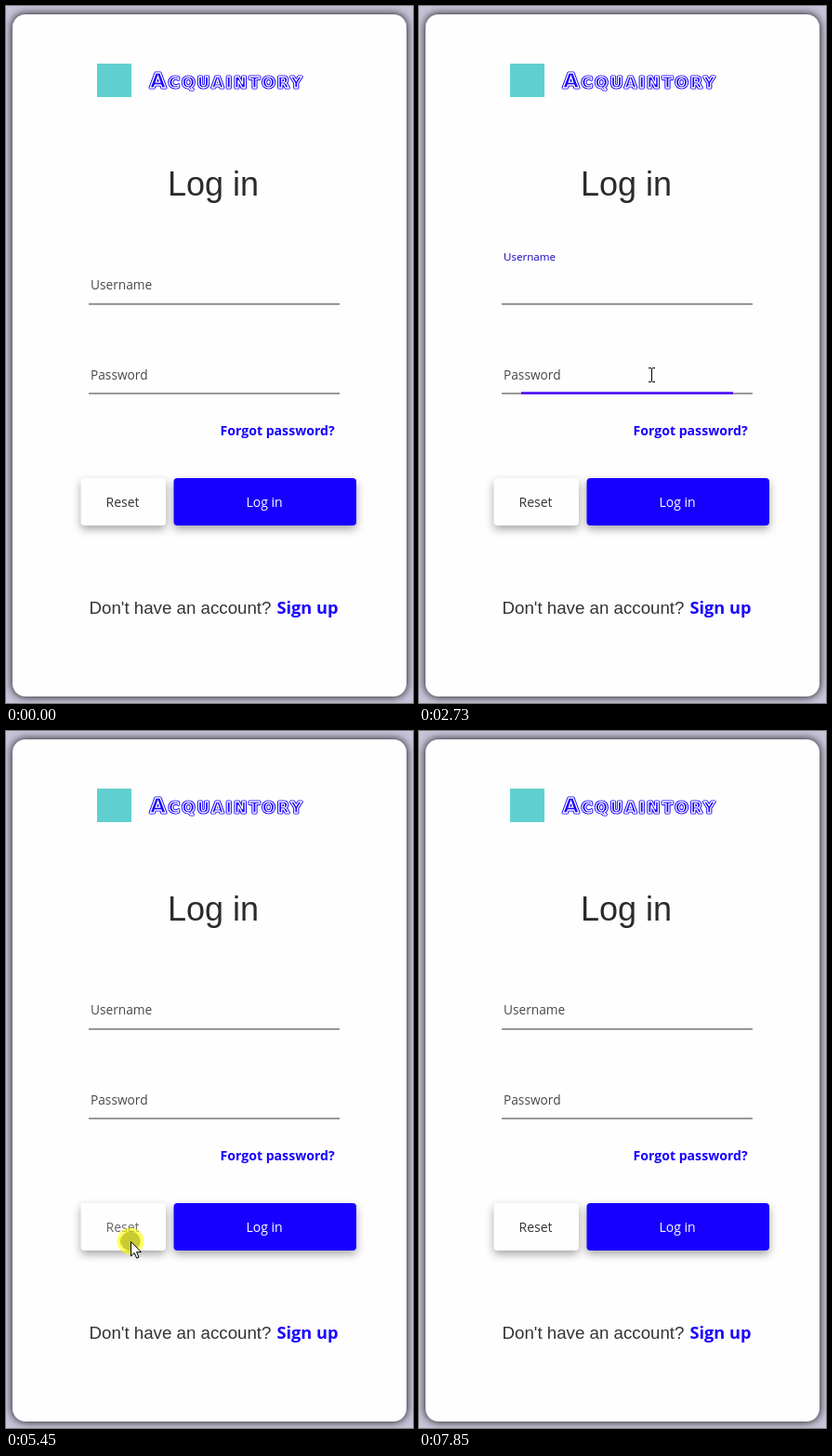
Recreate the animation shown at these times as an HTML page. Size 438 px wide and 750 px high, loop 8780 ms.

```html
<!DOCTYPE html>
<html lang="en">
<head>
<meta charset="utf-8">
<title>Log in</title>
<style>
html, body { margin: 0; width: 100%; height: 100%; overflow: hidden; background: #c6c4d8; }
.card {
  position: absolute; left: 7px; top: 9px; width: 424px; height: 734px;
  border-radius: 14px; background: #fefefe; box-shadow: 0 0 9px 1px rgba(0, 0, 0, .8);
}
svg { position: absolute; left: 0; top: 0; }
text { font: 14px "Open Sans", "Noto Sans", sans-serif; fill: #333; }
.title { font: 36px "Liberation Sans", sans-serif; fill: #2b2b2b; }
.ask { font: 18.72px "Liberation Sans", sans-serif; }
.link { font-weight: 700; font-size: 14.1px; fill: #1800ff; }
.big { font-size: 18.2px; }
.brand text { font: 700 16px "DejaVu Sans", sans-serif; letter-spacing: 2.9px; fill: #1800ff; }
.brand tspan { font-size: 22px; }
.edge { stroke: #1800ff; stroke-width: 3.2; stroke-linejoin: round; }
.inline { stroke: #fefefe; stroke-width: 1.3; }
.btn { filter: drop-shadow(0 4px 5px rgba(0, 0, 0, .35)); }
.line { fill: #777; }
.label { font-size: 13.7px; fill: #484848; }

/* 8.78 s loop; 1% is 87.8 ms */
.a { animation: 8.78s step-end infinite; }
.focus, .ripple { transform-box: fill-box; transform-origin: center; }
#userLabel { animation-name: userLabel; }
#passLabel { animation-name: passLabel; }
#userLine { animation-name: userLine; fill: #1400c8; }
#passLine { animation-name: passLine; fill: #5010ff; }
#userCaret { animation-name: userCaret; }
#passCaret { animation-name: passCaret; }
#logBtn { animation-name: logBtn; fill: #1800ff; }
#logWave { animation-name: logWave; fill: #9488ff; }
#resetText { animation-name: resetText; }
#resetWave { animation-name: resetWave; fill: #222; }
#pointer { animation-name: move; }
#arrow { animation-name: arrow; }
#beam { animation-name: beam; }
#halo { animation-name: halo; fill: #ff0; }

@keyframes userLabel {
  0%, 18.45% { transform: none; fill: #484848; }
  0%, 16.74%, 29.95% { animation-timing-function: cubic-bezier(.4, 0, .2, 1); }
  16.74% { transform: none; fill: #484848; }
  18.45%, 29.95% { transform: translateY(-31px) scale(.847); fill: #1400c0; }
  31.66%, 100% { transform: none; fill: #484848; }
}
@keyframes passLabel {
  0% { transform: none; fill: #484848; }
  29.95%, 52.51% { animation-timing-function: cubic-bezier(.4, 0, .2, 1); }
  29.95% { transform: none; fill: #484848; }
  31.66% { transform: translateY(-32px) scale(.847); fill: #6508dc; }
  52.51% { transform: translateY(-32px) scale(.847); fill: #484848; }
  54.21%, 100% { transform: none; fill: #484848; }
}
@keyframes userLine {
  0% { transform: scaleX(0); opacity: 1; }
  16.74% { transform: scaleX(0); opacity: 1; animation-timing-function: cubic-bezier(.4, 0, .2, 1); }
  18.91% { transform: none; opacity: 1; }
  29.95% { transform: none; opacity: 1; animation-timing-function: linear; }
  30.85%, 100% { transform: none; opacity: 0; }
}
@keyframes passLine {
  0% { transform: scaleX(0); opacity: 1; }
  29.95% { transform: scaleX(0); opacity: 1; animation-timing-function: cubic-bezier(.4, 0, .2, 1); }
  32% { transform: none; opacity: 1; }
  52.51% { transform: none; opacity: 1; animation-timing-function: linear; }
  53.4%, 100% { transform: none; opacity: 0; }
}
@keyframes userCaret {
  0%, 23.23%, 100% { opacity: 0; }
  17.2% { opacity: 1; }
}
@keyframes passCaret {
  0%, 38.27%, 50.2%, 100% { opacity: 0; }
  32%, 44.2% { opacity: 1; }
  48.8% { opacity: 0; }
}
@keyframes logBtn {
  0%, 55.13%, 100% { fill: #1800ff; filter: drop-shadow(0 4px 5px rgba(0, 0, 0, .35)); }
  52.51% { fill: #2a12ff; filter: drop-shadow(0 6px 7px rgba(0, 0, 0, .38)); }
}
@keyframes logWave {
  0% { transform: scale(0); opacity: 0; }
  52.51% { transform: scale(.1); opacity: .6; animation-timing-function: linear; }
  53.42% { transform: scale(.644); opacity: .6; animation-timing-function: ease-out; }
  55.13% { transform: none; opacity: .6; animation-timing-function: linear; }
  59.2%, 100% { transform: none; opacity: 0; }
}
@keyframes resetText {
  0%, 64.69%, 100% { fill: #333; }
  62.07% { fill: #666; }
}
@keyframes resetWave {
  0% { transform: scale(0); opacity: 0; }
  62.05% { transform: scale(.13); opacity: .6; animation-timing-function: linear; }
  64.69%, 100% { transform: none; opacity: 0; }
}
@keyframes move {
  0% { transform: translate(432px, 417px); }
  7.29% { transform: translate(432px, 417px); animation-timing-function: steps(3); }
  9.97% { transform: translate(372px, 330px); animation-timing-function: steps(3); }
  12.64% { transform: translate(300px, 260px); animation-timing-function: steps(2); }
  14.46% { transform: translate(273px, 298px); }
  24.1% { transform: translate(273px, 298px); animation-timing-function: steps(5, jump-both); }
  28.7% { transform: translate(250px, 397px); }
  36.56% { transform: translate(250px, 404px); }
  38.27% { transform: translate(250px, 405px); }
  41% { transform: translate(248px, 410px); animation-timing-function: steps(4); }
  44.53% { transform: translate(214px, 502px); animation-timing-function: steps(2); }
  46.24% { transform: translate(217px, 519px); animation-timing-function: steps(3); }
  48.86% { transform: translate(230px, 527px); }
  56.72% { transform: translate(230px, 527px); animation-timing-function: steps(4, jump-both); }
  60.25% { transform: translate(134px, 549px); }
  66.4% { transform: translate(150px, 575px); animation-timing-function: steps(4); }
  69.93% { transform: translate(250px, 712px); animation-timing-function: steps(4); }
  73.58% { transform: translate(326px, 653px); }
  83.14% { transform: translate(326px, 653px); animation-timing-function: steps(3, jump-both); }
  85.88%, 100% { transform: translate(299px, 740px); }
}
@keyframes arrow {
  0%, 13.5%, 89.41%, 100% { opacity: 0; }
  7.29%, 41.85% { opacity: 1; }
  25.8% { opacity: 1; }
  27.6% { opacity: 0; }
}
@keyframes beam {
  0%, 25.8%, 41.85%, 100% { opacity: 0; }
  13.5%, 27.6% { opacity: 1; }
}
@keyframes halo {
  0%, 18.2%, 31.1%, 53.3%, 63.8%, 76.2%, 100% { opacity: 0; }
  16.51%, 29.6%, 51.59%, 62.07%, 75.28% { opacity: .6; }
}
</style>
</head>
<body>
<div class="card"></div>
<svg width="438" height="750" viewBox="0 0 438 750">
  <defs>
    <clipPath id="logClip"><rect x="180.5" y="508" width="196.5" height="51" rx="4"/></clipPath>
    <clipPath id="resetClip"><rect x="80.5" y="508" width="91.5" height="51" rx="4"/></clipPath>
  </defs>

  <rect x="98" y="62" width="37" height="36" fill="#5fd0cf"/>
  <g class="brand">
    <text class="edge" x="155" y="88"><tspan>A</tspan>CQUAINTORY</text>
    <text class="inline" x="155" y="88"><tspan>A</tspan>CQUAINTORY</text>
  </g>
  <text class="title" x="174" y="204">Log in</text>

  <rect class="line" x="89" y="320" width="270" height="1.5"/>
  <rect class="a focus" id="userLine" x="89" y="319" width="270" height="2.6"/>
  <g transform="translate(91 305)"><text class="a label" id="userLabel">Username</text></g>
  <rect class="a" id="userCaret" x="90" y="288" width="1" height="23"/>

  <rect class="line" x="89" y="416.2" width="270" height="1.5"/>
  <rect class="a focus" id="passLine" x="89" y="415.2" width="270" height="2.6"/>
  <g transform="translate(91 402)"><text class="a label" id="passLabel">Password</text></g>
  <rect class="a" id="passCaret" x="90" y="385" width="1" height="23"/>

  <text class="link" x="230.5" y="462">Forgot password?</text>

  <rect class="btn" x="80.5" y="508" width="91.5" height="51" rx="4" fill="#fefefe"/>
  <text class="a" id="resetText" x="107.5" y="539">Reset</text>
  <g clip-path="url(#resetClip)"><circle class="a ripple" id="resetWave" cx="134" cy="549" r="75"/></g>

  <rect class="a btn" id="logBtn" x="180.5" y="508" width="196.5" height="51" rx="4"/>
  <text x="258.5" y="539" style="fill:#fff">Log in</text>
  <g clip-path="url(#logClip)"><circle class="a ripple" id="logWave" cx="230" cy="527" r="160"/></g>

  <text class="ask" x="89.5" y="654">Don't have an account?</text>
  <text class="link big" x="291.5" y="654">Sign up</text>

  <g class="a" id="pointer">
    <circle class="a" id="halo" r="14.5"/>
    <path class="a" id="arrow" d="M.5 .5v15.5l3.6-3.4 2.6 5.6 2.3-1-2.5-5.5h4.9z" fill="#fff" stroke="#000"/>
    <path class="a" id="beam" d="M-3-7.5h3m1 0h3M.5-7v14M-3 7.5h3m1 0h3" fill="none" stroke="#000"/>
  </g>
</svg>
</body>
</html>
```
